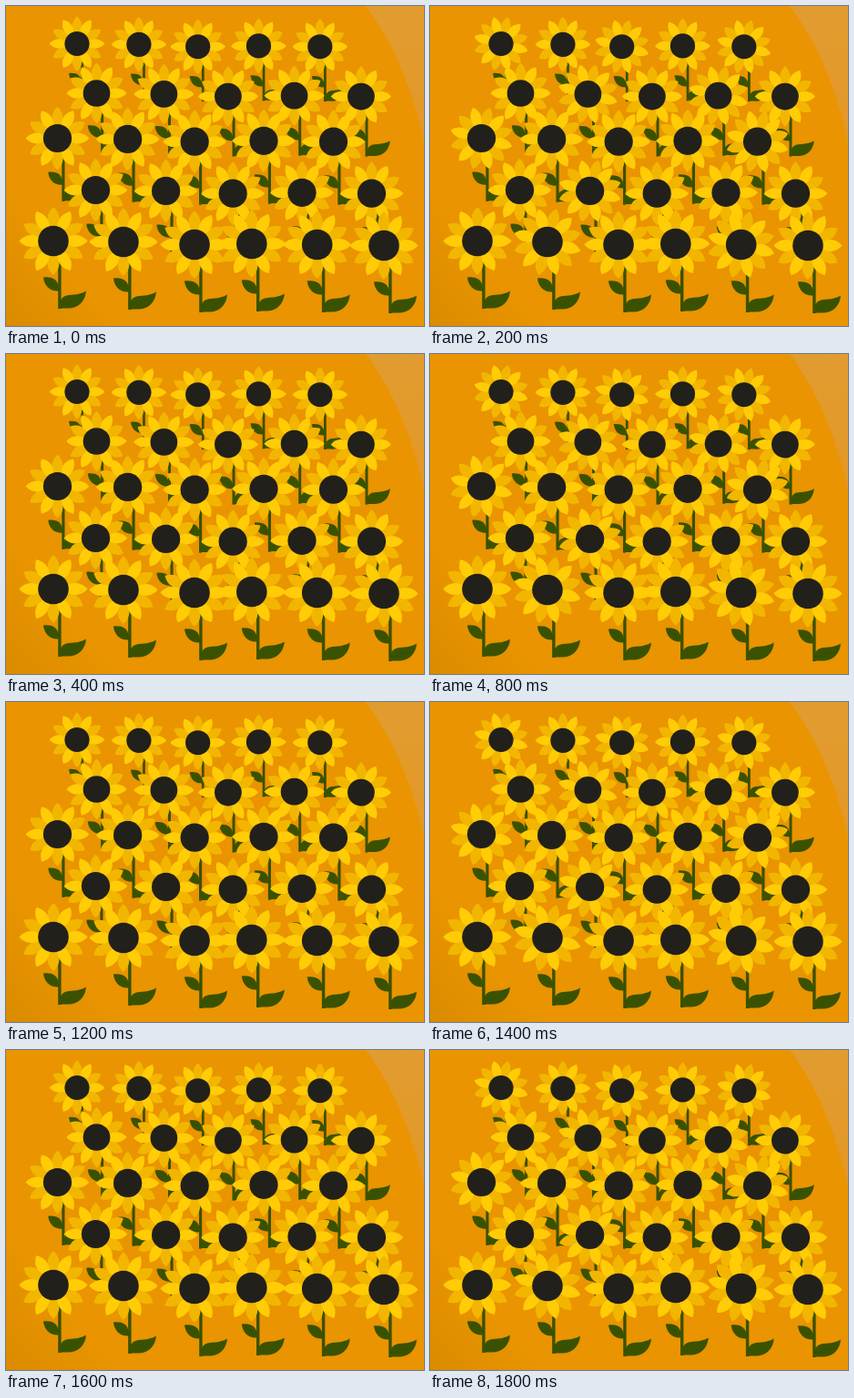
An HTML page for the animation above (2000 ms loop, 459 by 352 pixels).

```html
<!DOCTYPE html>
<html lang="en">
<head>
<meta charset="utf-8">
<title>Sunflowers</title>
<style>
  @property --lean { syntax: "<angle>"; inherits: true; initial-value: 0deg; }
  html, body { margin: 0; width: 100%; height: 100%; overflow: hidden; background: #e99400; }
  svg { display: block; width: 459px; height: 352px; }
  .stalk { fill: #3a5200; }
  .back { fill: #f2b600; }
  .front { fill: #ffcc05; }
  .seeds { fill: #22201a; }
  #field { animation: lean 2s step-end infinite; }
  .turn { transform: rotate(var(--lean)); }
  @keyframes lean {
    0%, 20%, 60%, 80% { --lean: 0deg; }
    10%, 40%, 70%, 90%, 100% { --lean: 15deg; }
  }
</style>
</head>
<body>
<svg viewBox="0 0 459 352">
  <defs>
    <radialGradient id="shade" gradientUnits="userSpaceOnUse" cx="400" cy="0" r="533">
      <stop offset=".83" stop-color="#da8b00" stop-opacity="0"/>
      <stop offset="1" stop-color="#da8b00"/>
    </radialGradient>
    <linearGradient id="glow" gradientUnits="userSpaceOnUse" x1="410" y1="0" x2="459" y2="150">
      <stop offset="0" stop-color="#e19c30"/>
      <stop offset="1" stop-color="#e49826"/>
    </linearGradient>
    <path id="petal" d="M0-37.5C4-34 6.6-29 6.4-24C6.2-19 4-14 0-10C-4-14-6.2-19-6.4-24C-6.6-29-4-34 0-37.5Z"/>
    <g id="stalk" class="stalk">
      <path d="M5.2 0H8.6V74.5H5.2Z"/>
      <path d="M6 74.5C6 65 10 60 17 59.500C25 59 31 58 36 55C35 67 27 74 16 74C12 74 9 73.500 6 74.500Z"/>
      <path d="M6.500 55C-3 56 -10 50 -11 40C-2 39 6 41 6.500 55Z"/>
    </g>
    <g id="head"></g>
  </defs>
  <rect width="459" height="352" fill="#e99400"/>
  <rect width="459" height="352" fill="url(#shade)"/>
  <path d="M395 0C424 38 447 91 459 151V0Z" fill="url(#glow)"/>
  <g id="field"></g>
</svg>
<script>
  // columns in units of a row's step, and how far each column sinks
  const even = [0, 1.018, 1.989, 2.99, 4];
  const loose = [0, 1.06, 2.135, 3, 3.99, 5];
  const dips = [0, 1, 4, 3, 4, 5];

  // a 1 in turns marks a flower whose head swings
  const rows = [
    { x: 78, y: 41.5, step: 66.7, scale: 0.81, cols: even, turns: "10101" },
    { x: 99.5, y: 96, step: 72.6, scale: 0.885, cols: even, turns: "01010" },
    { x: 56.5, y: 145.5, step: 75.75, scale: 0.93, cols: even, turns: "10001" },
    { x: 98.5, y: 202.5, step: 75.75, scale: 0.93, cols: even, turns: "01000" },
    { x: 52, y: 258.5, step: 72.6, scale: 1, cols: loose, turns: "010010" }
  ];

  const ring = (name, start) => Array.from({ length: 6 }, (_, i) =>
    `<use href="#petal" class="${name}" transform="rotate(${start + i * 60})"/>`).join("");

  const flower = (x, y, scale, turns) =>
    `<g transform="translate(${x} ${y}) scale(${scale})">
      <use href="#stalk"/>
      <g class="${turns ? "turn" : ""}"><use href="#head"/></g>
      <circle class="seeds" r="16.8"/>
    </g>`;

  const plant = row => row.cols.map((col, i) => flower(
    row.x + col * row.step, row.y + dips[i] * row.scale, row.scale, row.turns[i] === "1"
  )).join("");

  document.getElementById("head").innerHTML = ring("back", 0) + ring("front", 30);
  document.getElementById("field").innerHTML = rows.map(plant).join("");
</script>
</body>
</html>
```
